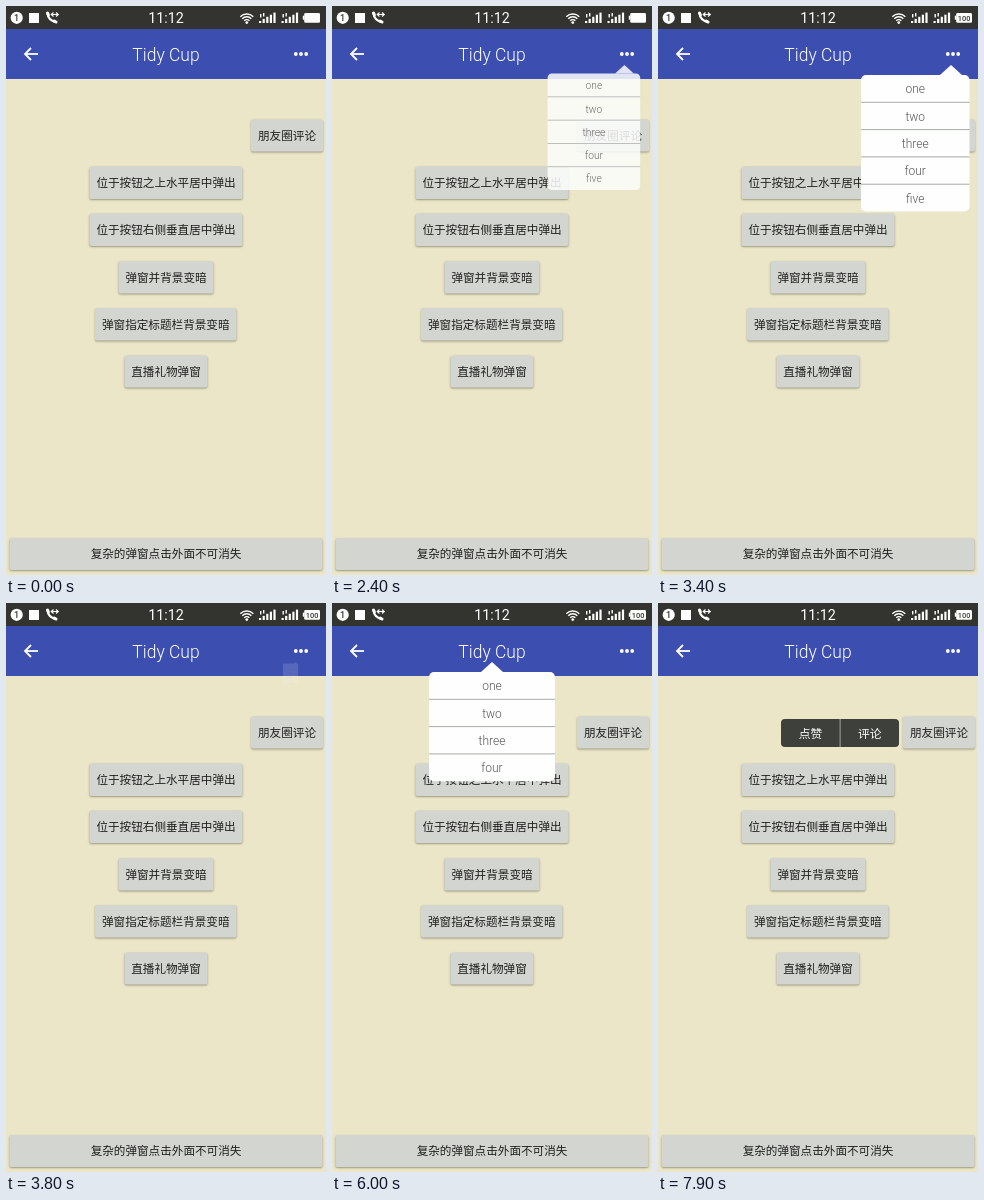
Recreate the animation shown at these times as an HTML page with a canvas. Size 320 px wide and 569 px high, loop 8 s.

```html
<!DOCTYPE html>
<html lang="zh-CN">
<head>
<meta charset="utf-8">
<title>Popup menus</title>
<style>
html, body { margin: 0; width: 100%; height: 100%; overflow: hidden; background: #ebe6c8; }
canvas { display: block; width: 320px; height: 569px; }
</style>
</head>
<body>
<canvas id="stage"></canvas>
<script>
const W = 320, H = 569, LOOP = 8000, STEP = 100;
const POP_MS = 200;
const CJK = '"Noto Sans CJK SC", "Noto Sans CJK", sans-serif';
const LATIN = 'Roboto, "Liberation Sans", sans-serif';
const BAR = '#33342f', BLUE = '#3c4fb1', WHITE = '#fdfefd';

const canvas = document.getElementById('stage');
const ctx = canvas.getContext('2d');
const ratio = Math.max(1, window.devicePixelRatio || 1);
canvas.width = W * ratio;
canvas.height = H * ratio;

const clamp = x => Math.min(1, Math.max(0, x));
const ease = x => (1 - Math.cos(Math.PI * clamp(x))) / 2;

// 0 = hidden, 1 = fully open
function openness(t, opens, closes) {
  return ease((t - opens) / POP_MS) - ease((t - closes) / POP_MS);
}

function rect(x, y, w, h, color) {
  ctx.fillStyle = color;
  ctx.fillRect(x, y, w, h);
}

function round(x, y, w, h, r, color) {
  ctx.fillStyle = color;
  ctx.beginPath();
  ctx.roundRect(x, y, w, h, r);
  ctx.fill();
}

function disc(x, y, r, color) {
  ctx.fillStyle = color;
  ctx.beginPath();
  ctx.arc(x, y, r, 0, Math.PI * 2);
  ctx.fill();
}

function line(points, width, color) {
  ctx.strokeStyle = color;
  ctx.lineWidth = width;
  ctx.beginPath();
  points.forEach(([x, y], i) => i ? ctx.lineTo(x, y) : ctx.moveTo(x, y));
  ctx.stroke();
}

function label(text, x, baseline, font, color) {
  ctx.font = font;
  ctx.fillStyle = color;
  ctx.textAlign = 'center';
  ctx.textBaseline = 'alphabetic';
  ctx.fillText(text, x, baseline);
}

function button([text, x, y, w, h], pressed = 0) {
  ctx.save();
  ctx.shadowColor = 'rgba(60, 60, 40, 0.45)';
  ctx.shadowBlur = (2 + 2 * pressed) * ratio;
  ctx.shadowOffsetY = (1 + pressed) * ratio;
  round(x, y, w, h, 2, pressed ? '#c9cbc8' : '#d3d5d1');
  ctx.restore();
  label(text, x + w / 2, y + h / 2 + 4.4, '11.6px ' + CJK, '#1f201d');
}

const BUTTONS = [
  ['位于按钮之上水平居中弹出', 83.5, 160.5, 153, 32.5],
  ['位于按钮右侧垂直居中弹出', 83.5, 207.5, 153, 32.5],
  ['弹窗并背景变暗', 112.5, 255, 95, 32.5],
  ['弹窗指定标题栏背景变暗', 89, 302, 141.5, 32.5],
  ['直播礼物弹窗', 118.5, 349.5, 83, 32],
  ['复杂的弹窗点击外面不可消失', 3.5, 532, 313, 32]
];
const COMMENT = ['朋友圈评论', 245, 113.5, 72, 32];

function phone(x, y) {
  ctx.lineCap = 'round';
  ctx.strokeStyle = WHITE;
  ctx.lineWidth = 2.2;
  ctx.beginPath();
  ctx.moveTo(x + 1.5, y + 1.5);
  ctx.quadraticCurveTo(x + 2, y + 9, x + 10, y + 10.5);
  ctx.stroke();
  line([[x + 1.5, y + 1.5], [x + 2.4, y + 3.4]], 3, WHITE);
  line([[x + 8.2, y + 9.6], [x + 10, y + 10.5]], 3, WHITE);
  ctx.lineCap = 'butt';
  line([[x + 5, y + 3], [x + 12, y + 3]], 1.1, WHITE);
  line([[x + 10, y + 1], [x + 12.3, y + 3], [x + 10, y + 5]], 1.1, WHITE);
  line([[x + 7.5, y + 1], [x + 5.2, y + 3], [x + 7.5, y + 5]], 1.1, WHITE);
}

function wifi(x, y) {
  ctx.strokeStyle = WHITE;
  ctx.lineWidth = 1.4;
  for (const r of [3.6, 6.4, 9.2]) {
    ctx.beginPath();
    ctx.arc(x, y, r, -Math.PI * 0.75, -Math.PI * 0.25);
    ctx.stroke();
  }
  disc(x, y - 0.6, 1.4, WHITE);
}

function signal(x) {
  for (let i = 0; i < 5; i++) {
    const h = 2 + i * 2.1;
    rect(x + i * 3.6, 17 - h, 2.2, h, WHITE);
  }
  rect(x + 1, 8, 1.4, 3.5, WHITE);
  rect(x + 4, 7, 1.4, 3.5, WHITE);
}

// The charge figure fades out and back in.
function chargeAlpha(t) {
  const p = (t + 625) % 2515;
  if (p < 630) return 1 - clamp(p / 270);
  return 1 - Math.pow(1 - clamp((p - 630) / 480), 2.2);
}

function battery(t) {
  rect(296.8, 9.7, 1.6, 4, WHITE);
  round(298.2, 7, 15.8, 9.8, 1.4, WHITE);
  ctx.globalAlpha = chargeAlpha(t);
  label('100', 306.1, 14.8, '500 7.4px ' + LATIN, BAR);
  ctx.globalAlpha = 1;
}

function header(t) {
  rect(0, 0, W, 23, BAR);
  disc(10.7, 11.8, 6.1, WHITE);
  label('1', 10.5, 15.1, '500 9px ' + LATIN, BAR);
  rect(23, 7, 10, 10, WHITE);
  phone(40, 5.5);
  label('11:12', 160, 16.8, '14.3px ' + LATIN, WHITE);
  wifi(240.8, 17.2);
  signal(253);
  signal(275.5);
  battery(t);

  rect(0, 23, W, 50, BLUE);
  line([[32, 48], [19.5, 48]], 1.8, WHITE);
  line([[25, 42], [19, 48], [25, 54]], 1.8, WHITE);
  label('Tidy Cup', 160, 54.6, '300 17.5px ' + LATIN, WHITE);
  for (const x of [289.8, 295, 300.2]) disc(x, 48, 1.9, WHITE);
}

function popup(amount, px, py, draw) {
  if (amount < 0.001) return;
  ctx.save();
  ctx.globalAlpha = amount;
  ctx.translate(px, py);
  ctx.scale(amount, amount);
  ctx.translate(-px, -py);
  draw();
  ctx.restore();
}

function listCard(x, w, tip, rows) {
  const top = 69, rowH = 27.3;
  ctx.fillStyle = WHITE;
  ctx.beginPath();
  ctx.moveTo(tip - 11, top);
  ctx.lineTo(tip, 59);
  ctx.lineTo(tip + 11, top);
  ctx.fill();
  round(x, top, w, rowH * rows.length, 5, WHITE);
  rows.forEach((text, i) => {
    const y = top + rowH * i;
    if (i) rect(x, y - 0.5, w, 1, '#a9aba8');
    label(text, x + w / 2, y + 18.4, '300 12px ' + LATIN, '#555754');
  });
}

function commentBar() {
  round(123, 116, 118, 28, 4, '#3d403b');
  rect(181.6, 116, 1, 28, '#a4a69f');
  label('点赞', 152.5, 134.5, '11.8px ' + CJK, WHITE);
  label('评论', 211.7, 134.5, '11.8px ' + CJK, WHITE);
}

const COUNT = ['one', 'two', 'three', 'four', 'five'];

function render(t) {
  ctx.setTransform(ratio, 0, 0, ratio, 0, 0);
  rect(0, 0, W, H, '#ebe6c8');
  header(t);
  BUTTONS.forEach(b => button(b));
  button(COMMENT, t >= 7400 && t < 7700 ? 1 : 0);

  const menu = openness(t, 650, 2350) + openness(t, 3151, 3649);
  popup(menu, 289, 59, () => listCard(203, 108.5, 293, COUNT));
  popup(openness(t, 5315, 6500), 160, 59,
    () => listCard(97, 126, 160, COUNT.slice(0, 4)));
  popup(openness(t, 7660, LOOP), 241, 130, commentBar);
}

const start = performance.now();
function frame() {
  const t = (performance.now() - start) % LOOP;
  render(Math.floor(t / STEP) * STEP);
  requestAnimationFrame(frame);
}
frame();
</script>
</body>
</html>
```
